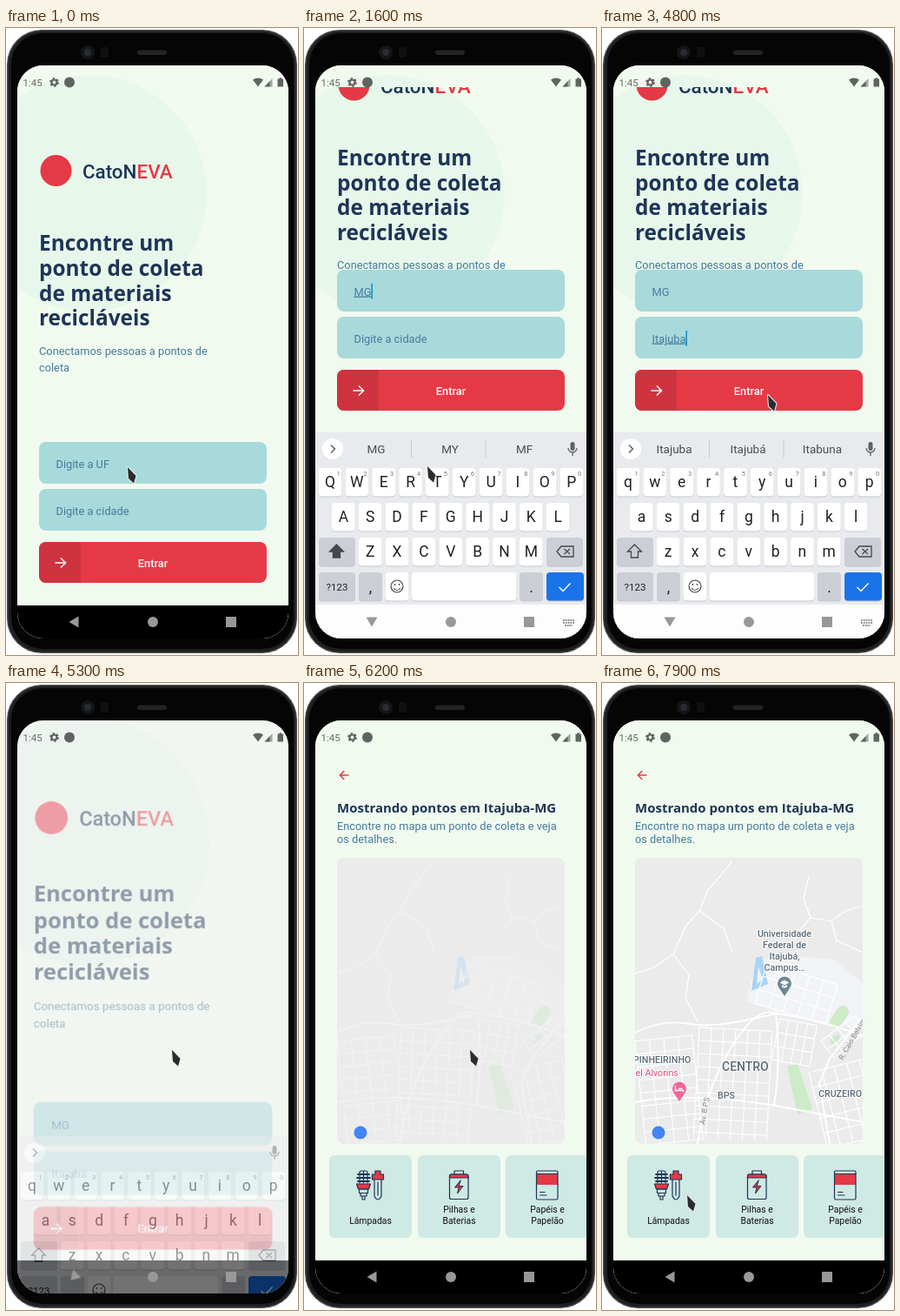
Animation, 336 px wide and 721 px high, one loop 8000 ms. Source, as an HTML page:

```html
<!DOCTYPE html>
<html lang="pt">
<head>
<meta charset="utf-8">
<title>Pontos de coleta</title>
<style>
html, body { margin: 0; width: 100%; height: 100%; overflow: hidden; background: #fff; }
svg { display: block; width: 336px; height: 721px; font: 12.8px Roboto, sans-serif; }
.title { font: 700 24.4px "Open Sans", sans-serif; fill: #1d3557; }
.sub { fill: #457b9d; }
.mid { text-anchor: middle; }
.field { fill: #a8dadc; }
.entry { fill: #457b9d; }
.entry.live { text-decoration: underline; }
.card { fill: #cfe9e4; }
.label { font-size: 10.4px; text-anchor: middle; fill: #111; }
.line { fill: none; stroke: #1d3557; stroke-width: 1.2; stroke-linejoin: round; stroke-linecap: round; }
.road { fill: none; stroke: #fff; stroke-linecap: round; stroke-linejoin: round; }
.place { font-weight: 500; fill: #5b6b7a; stroke: #fff; stroke-width: 2; paint-order: stroke; }
.street { font-size: 8.4px; fill: #7d8388; }
.key { font-size: 17.5px; text-anchor: middle; fill: #202124; }
.hint { font-size: 7.5px; text-anchor: middle; fill: #777; }
.word { font-size: 13.5px; text-anchor: middle; fill: #4a4d51; }

.anim { animation: 8s linear -20ms infinite both; }
#home { animation-name: leave; transform-origin: 168.5px 353.5px; }
#head { animation-name: head; }
#form { animation-name: form; }
#keys { animation-name: keys; }
#back { animation-name: back; transform-origin: 78px 683px; }
#details { animation-name: details; }
#badge { animation-name: badge; }
#places { animation-name: places; }
#roads { animation-name: roads; }
#names { animation-name: names; }
#mouse { animation-name: mouse; }

@keyframes leave {
  0% { transform: none; opacity: 1; animation-timing-function: step-end }
  65% { transform: scale(1.02); opacity: .85; animation-timing-function: step-end }
  66.25% { transform: scale(1.0476); opacity: .46; animation-timing-function: step-end }
  67.5% { transform: scale(1.05); opacity: .2; animation-timing-function: step-end }
  68.75% { transform: scale(1.05); opacity: .06; animation-timing-function: step-end }
  72.5%, 100% { transform: scale(1.05); opacity: 0 }
}
@keyframes head {
  0%, 5% { transform: none; animation-timing-function: steps(5, jump-start) }
  11.25% { transform: translateY(-98.5px); animation-timing-function: step-end }
  65%, 100% { transform: none }
}
@keyframes form {
  0%, 5% { transform: none; animation-timing-function: steps(5, jump-start) }
  11.25% { transform: translateY(-198px); animation-timing-function: step-end }
  65%, 100% { transform: none }
}
@keyframes keys {
  0% { transform: translateY(90px); opacity: 0; animation-timing-function: step-end }
  5% { transform: translateY(80px); opacity: .2; animation-timing-function: step-end }
  6.25% { transform: translateY(35px); opacity: .6; animation-timing-function: step-end }
  7.5% { transform: translateY(8px); opacity: .95; animation-timing-function: step-end }
  8.75% { transform: none; opacity: 1; animation-timing-function: step-end }
  65% { transform: translateY(20px); opacity: .8; animation-timing-function: step-end }
  66.25% { transform: translateY(56px); opacity: .45; animation-timing-function: step-end }
  67.5% { transform: translateY(75px); opacity: .15; animation-timing-function: step-end }
  68.75%, 100% { transform: translateY(90px); opacity: 0 }
}
@keyframes back {
  0%, 5% { transform: none; animation-timing-function: steps(4, jump-start) }
  10%, 65% { transform: rotate(-90deg); animation-timing-function: steps(4, jump-start) }
  70%, 100% { transform: none }
}
@keyframes details {
  0% { opacity: 0; animation-timing-function: step-end }
  67.5% { opacity: .3; animation-timing-function: step-end }
  68.75% { opacity: .85; animation-timing-function: step-end }
  72.5%, 100% { opacity: 1 }
}
@keyframes badge {
  0% { opacity: 0; transform: translateY(95px); animation-timing-function: step-end }
  72.5% { opacity: 1; transform: translateY(95px); animation-timing-function: step-end }
  75%, 100% { opacity: 1; transform: none }
}
@keyframes places {
  0% { opacity: 0; animation-timing-function: step-end }
  75%, 100% { opacity: 1 }
}
@keyframes roads {
  0%, 77.5% { opacity: 0; animation-timing-function: steps(3, jump-start) }
  81.25%, 100% { opacity: 1 }
}
@keyframes names {
  0%, 81.25% { opacity: 0; animation-timing-function: steps(2, jump-start) }
  83.75%, 100% { opacity: 1 }
}
@keyframes mouse {
  0% { transform: translate(140px, 505px); animation-timing-function: step-end }
  5%, 25% { transform: translate(142px, 504px); animation-timing-function: steps(5, jump-start) }
  31.25%, 56.25% { transform: translate(172px, 353px); animation-timing-function: steps(4, jump-start) }
  61.25%, 85% { transform: translate(191px, 422px); animation-timing-function: steps(3, jump-start) }
  88.75%, 90% { transform: translate(201px, 478px); animation-timing-function: steps(8, jump-start) }
  100% { transform: translate(98px, 589px) }
}
</style>
</head>
<body>
<svg viewBox="0 0 336 721">
  <defs>
    <clipPath id="screen"><rect x="13" y="43" width="312" height="659" rx="30"/></clipPath>
    <clipPath id="below"><rect x="0" y="68" width="336" height="640"/></clipPath>
    <clipPath id="mapBox"><rect x="38" y="201" width="262" height="329" rx="8"/></clipPath>
  </defs>

  <!-- phone -->
  <rect x="1" y="2" width="334" height="717" rx="40" fill="#46484c"/>
  <rect x="2.500" y="3.500" width="331" height="714" rx="38.500" fill="#1d1f21"/>
  <rect x="6" y="6" width="325" height="708" rx="36" fill="#050505"/>
  <circle cx="94" cy="28" r="8" fill="#141517"/>
  <circle cx="94" cy="28" r="4" fill="#282b30"/>
  <rect x="109" y="22" width="9" height="12" rx="2" fill="#101010"/>
  <rect x="151" y="25.500" width="34" height="5.500" rx="2.700" fill="#242425"/>

  <g clip-path="url(#screen)">
    <rect x="13" y="43" width="312" height="659" fill="#f2f2f2"/>

    <g id="home" class="anim">
      <rect x="13" y="43" width="312" height="659" fill="#f1faee"/>
      <circle cx="95" cy="190" r="136" fill="#e8f7eb"/>
      <g clip-path="url(#below)">
        <g id="head" class="anim">
          <circle cx="57.500" cy="164" r="18" fill="#e63946"/>
          <text x="88" y="173" font-size="22.400" font-weight="500" fill="#1d3557">CatoN<tspan fill="#e63946">EVA</tspan></text>
          <g class="title">
            <text x="38" y="256">Encontre um</text>
            <text x="38" y="285">ponto de coleta</text>
            <text x="38" y="313.500">de materiais</text>
            <text x="38" y="342">recicláveis</text>
          </g>
          <text class="sub" x="38" y="375.500">Conectamos pessoas a pontos de</text>
          <text class="sub" x="38" y="394.500">coleta</text>
        </g>
        <g id="form" class="anim">
          <rect class="field" x="38" y="476" width="262" height="48" rx="8"/>
          <rect class="field" x="38" y="530" width="262" height="48" rx="8"/>
          <text class="entry" x="57.500" y="505.500"></text>
          <text class="entry" x="57.500" y="559.500"></text>
          <rect id="caret" width="1.600" height="17.500" fill="#168fc4"/>
          <rect x="38" y="591" width="262" height="47" rx="8" fill="#e63946"/>
          <path d="M46 591H86V638H46a8 8 0 0 1-8-8V599a8 8 0 0 1 8-8Z" fill="#cf333f"/>
          <path d="M56.500 615H68.500M63 609.500 68.500 615 63 620.500" fill="none" stroke="#fff" stroke-width="1.600"/>
          <text class="mid" x="169" y="619.500" fill="#fff" font-weight="500">Entrar</text>
        </g>
      </g>
    </g>

    <g id="details" class="anim">
      <rect x="13" y="43" width="312" height="659" fill="#f1faee"/>
      <path d="M51.500 106H41.500M46.300 101 41.300 106 46.300 111" fill="none" stroke="#e63946" stroke-width="1.400"/>
      <text class="title" x="38" y="148.500" style="font-size:15px">Mostrando pontos em Itajuba-MG</text>
      <text class="sub" x="38" y="168.500">Encontre no mapa um ponto de coleta e veja</text>
      <text class="sub" x="38" y="183.500">os detalhes.</text>

      <g id="places" class="anim">
        <g clip-path="url(#mapBox)">
          <rect x="38" y="201" width="262" height="329" fill="#ebebeb"/>
          <g id="roads" class="anim">
            <path d="M166 366 176 326 200 312 266 318 300 345V398L262 392 204 380Z" fill="#f1f3f6"/>
            <path d="M172 354 177 316 184 314 191 346 182 350Z" fill="#a9d4f5"/>
            <path d="M178 346 180 326 185 341Z" fill="#f1f3f6"/>
            <g fill="#cdeac9">
              <rect x="266" y="370" width="14" height="28" rx="7" transform="rotate(35 273 384)"/>
              <ellipse cx="268" cy="410" rx="7" ry="3.500" transform="rotate(-45 268 410)"/>
              <path d="M213 441 225 438 242 489 225 497Z"/>
            </g>
            <g id="grids" class="road"></g>
            <g class="road" stroke-width="1.200">
              <path d="M136 222 122 238 112 262 96 280 82 312 58 328 38 334M112 262 140 282 150 310M136 222 150 204M82 312 100 336 96 362 110 390"/>
              <path d="M300 256 280 262 264 274 240 270 232 248 238 222M264 274 270 296 300 310M240 270 228 284"/>
            </g>
            <g class="road" stroke-width="1.900">
              <path d="M38 402Q70 386 100 392T200 380Q250 386 300 406"/>
              <path d="M110 530Q118 470 148 420T200 380"/>
              <path d="M200 380Q206 440 198 486M300 384 262 432 250 460 262 530"/>
              <path d="M38 482Q100 470 200 486L300 505"/>
            </g>
          </g>
          <g id="names" class="anim">
            <g class="place mid" font-size="10.700">
              <text x="210" y="292">Universidade</text>
              <text x="210" y="305">Federal de</text>
              <text x="210" y="318">Itajubá,</text>
              <text x="210" y="331">Campus…</text>
            </g>
            <g class="place" font-size="10.700">
              <text x="36" y="437">PINHEIRINHO</text>
              <text x="133" y="478">BPS</text>
              <text x="249" y="475.500">CRUZEIRO</text>
              <text x="138" y="446" font-size="14">CENTRO</text>
              <text x="35" y="452" fill="#d8487f" style="font-weight:400">tel Alvorins</text>
            </g>
            <text class="street" transform="translate(118 508) rotate(-80)">Av. B.P.S</text>
            <text class="street" transform="translate(277 434) rotate(-60)">R. Caio Belvim</text>
            <path d="M210 360 204 351A8 8 0 1 1 216 351Z" fill="#6d8794"/>
            <path d="M204.500 344.500 210 341.500 215.500 344.500 210 347.500ZM207 347V349.500Q210 351.500 213 349.500V347L210 348.800Z" fill="#fff"/>
            <path d="M89 481 83 472A8 8 0 1 1 95 472Z" fill="#f0659a"/>
            <path d="M84.500 463V470M84.500 468.500H93.500V470M88 466.500H92.500" fill="none" stroke="#fff" stroke-width="1.400"/>
          </g>
        </g>

        <rect class="card" x="29" y="543" width="95" height="95" rx="6"/>
        <rect class="card" x="131" y="543" width="95" height="95" rx="6"/>
        <rect class="card" x="232" y="543" width="95" height="95" rx="6"/>
        <g class="label">
          <text x="76.500" y="621.500">Lâmpadas</text>
          <text x="178.500" y="609">Pilhas e</text>
          <text x="178.500" y="621.500">Baterias</text>
          <text x="280" y="609">Papéis e</text>
          <text x="280" y="621.500">Papelão</text>
        </g>
        <g class="line">
          <path d="M64 575V563Q64 561 66 561H71Q73 561 73 563V575M68.500 561V575"/>
          <path d="M62 565H75M61 569H76M62 573H75" stroke-width="1.800"/>
          <path d="M60.500 576H76.500L74.500 582H62.500Z" fill="#e63946"/>
          <path d="M63.500 582H73.500V586.500H63.500ZM65 586.500H72V590H65ZM67 590V594H70V590"/>
          <path d="M82 561H88V565H91.500V571H78.500V565H82Z" fill="#e63946"/>
          <path d="M81 571V590Q85 598 89 590V571M85 574V589"/>
          <rect x="167.500" y="565" width="21.500" height="28.500" rx="2"/>
          <path d="M167.500 569V567Q167.500 565 169.500 565H187Q189 565 189 567V569Z" fill="#e63946"/>
          <path d="M173 565V561H183.500V565"/>
          <path d="M180 572 173.500 580H178L176.500 587 183 578.500H178.500Z" fill="#e63946" stroke-width="1"/>
          <path d="M268 564.500H292V577H268Z" fill="#e63946" stroke="none"/>
          <rect x="267.500" y="561" width="24.500" height="33" rx="1.500"/>
          <path d="M268 564.500H292M271.500 585.500H277M271.500 589H279"/>
        </g>
      </g>
      <circle id="badge" class="anim" cx="65" cy="517" r="7.500" fill="#4285f4"/>
    </g>

    <rect x="13" y="664" width="312" height="38" fill="#000"/>

    <g id="keys" class="anim">
      <rect x="13" y="465" width="312" height="198" fill="#e8eaed"/>
      <rect x="13" y="663" width="312" height="130" fill="#fdfdfd"/>
      <circle cx="33" cy="484" r="12" fill="#fff"/>
      <path id="chevron" d="M31 479.500 35.500 484 31 488.500" fill="none" stroke="#5f6368" stroke-width="1.500"/>
      <text class="word" x="83" y="488.500"></text>
      <text class="word" x="168" y="488.500"></text>
      <text class="word" x="253.500" y="488.500"></text>
      <path id="rules" d="M123.500 474V494M209 474V494" stroke="#c9ccd0"/>
      <rect x="306.500" y="476" width="5" height="10" rx="2.500" fill="#5f6368"/>
      <path d="M304 483a5 5 0 0 0 10 0M309 488V492" fill="none" stroke="#5f6368" stroke-width="1.300"/>
      <g id="pad"></g>
      <path id="shift" d="M37.500 594 45.500 602H41.500V609H33.500V602H29.500Z" stroke="#44474b" stroke-width="1.300"/>
      <path d="M291 602 296 596H310V608H296ZM299.500 599 306 605M306 599 299.500 605" fill="none" stroke="#44474b" stroke-width="1.300"/>
      <g fill="none" stroke="#44474b" stroke-width="1.200">
        <circle cx="107" cy="642" r="7"/>
        <path d="M103 644Q107 649 111 644M104.500 639V641M109.500 639V641"/>
      </g>
      <path d="M293.500 643 298 647.500 306.500 638.500" fill="none" stroke="#fff" stroke-width="1.500"/>
      <path d="M298 681H311M298 684H311M300 687H309" stroke="#8c8c8c" stroke-width="1.800" stroke-dasharray="1.800 1"/>
    </g>

    <g fill="#989898">
      <path id="back" class="anim" d="M72.500 683 83.500 676.500V689.500Z"/>
      <circle cx="169" cy="683" r="6"/>
      <rect x="253" y="677" width="12" height="12"/>
    </g>

    <!-- status bar -->
    <g fill="#5f6361">
      <text x="19.500" y="67" font-size="11.500" fill="#666a68">1:45</text>
      <circle cx="55.500" cy="62.500" r="3" fill="none" stroke="#5f6361" stroke-width="2.200"/>
      <circle cx="55.500" cy="62.500" r="4.600" fill="none" stroke="#5f6361" stroke-width="1.700" stroke-dasharray="2.400 2.417"/>
      <circle cx="73" cy="62.500" r="6"/>
      <path d="M284 59.500Q290 55.500 296 59.500L290 67.500Z"/>
      <path d="M297.500 67.500 306.500 58V67.500Z" opacity=".55"/>
      <path d="M297.500 67.500 303.500 61.200V67.500Z"/>
      <path d="M312.500 58.500H314.500V57.300H317V58.500H319V67.500H312.500Z"/>
    </g>
  </g>

  <g id="mouse" class="anim">
    <path d="M0 0 9.500 10 7 18.500 1 13Z" fill="#2c2c2e" stroke="#e9ecea" stroke-width="2.200" stroke-linejoin="round" paint-order="stroke"/>
  </g>
</svg>
<script>
const $ = id => document.getElementById(id);
const all = sel => [...document.querySelectorAll(sel)];

// keyboard
const keyRect = (x, y, w, h, fill) =>
  `<rect x="${x}" y="${y + 1}" width="${w}" height="${h}" rx="4" fill="#c3c6ca"/>` +
  `<rect x="${x}" y="${y}" width="${w}" height="${h}" rx="4" fill="${fill}"/>`;
const grey = '#cbced4';
let pad = '';
[['qwertyuiop', 30, 506], ['asdfghjkl', 45.4, 546], ['zxcvbnm', 76.2, 586]].forEach(([row, x0, y], r) =>
  [...row].forEach((c, i) => {
    const x = x0 + i * 30.85;
    pad += keyRect(x - 13.3, y, 26.6, 32.5, '#fff') + `<text class="key letter" x="${x}" y="${y + 22}">${c}</text>`;
    if (!r) pad += `<text class="hint" x="${x + 9.5}" y="${y + 8.5}">${(i + 1) % 10}</text>`;
  }));
[[17, 586, 42, grey], [279, 586, 42, grey], [17, 626, 42, grey], [63, 626, 27, grey], [93.5, 626, 27, '#fff'],
 [124, 626, 120, '#fff'], [248, 626, 27, grey], [279, 626, 43, '#1a73e8']]
  .forEach(([x, y, w, fill]) => pad += keyRect(x, y, w, 32.5, fill));
pad += '<text class="key" x="38" y="647" style="font-size:11.5px">?123</text>' +
  '<text class="key" x="76.500" y="649">,</text><text class="key" x="261.500" y="649">.</text>';
$('pad').innerHTML = pad;

// street blocks: origin, size, tilt, gaps
const grid = (x, y, w, h, tilt, gx, gy) => {
  let d = '';
  for (let i = 0; i <= w; i += gx) d += `M${i} 0V${h}`;
  for (let j = 0; j <= h; j += gy) d += `M0 ${j}H${w}`;
  return `<path transform="translate(${x} ${y}) rotate(${tilt})" d="${d}" stroke-width="1.1"/>`;
};
$('grids').innerHTML = grid(112, 396, 84, 126, 3, 14, 15) + grid(38, 412, 66, 120, -6, 16.5, 15) +
  grid(204, 386, 44, 48, 10, 11, 16) + grid(190, 322, 85, 48, 17, 17, 16) +
  grid(238, 448, 75, 90, -14, 15, 18) + grid(252, 412, 48, 24, -38, 12, 12);

// typing: [from ms, value]
const uf = [[0, ''], [1400, 'M'], [1500, 'MG']];
const city = [[0, ''], [3300, 'I'], [3500, 'It'], [3600, 'Ita'], [3700, 'Itaj'], [3800, 'Itaju'], [4000, 'Itajub'], [4100, 'Itajuba']];
const words = [[0, ''], [1400, 'M My Me'], [1500, 'MG MY MF'], [2700, ''], [3300, "I I'm It"], [3500, "It It's If"],
  [3700, 'Ita Italy Its'], [4000, 'Itajub Itajuba Itajubá'], [4300, 'Itajuba Itajubá Itabuna'], [5200, '']];
const focus = [[0, -1], [500, 0], [2700, 1], [5200, -1]];
const blink = [[0, 1], [1000, 0], [1400, 1], [2000, 0], [2400, 1], [3100, 0], [3300, 1], [4500, 0], [4800, 1]];
const at = (list, t) => list.findLast(e => e[0] <= t)[1];

const entries = all('.entry'), slots = all('.word'), letters = all('.letter');
const hints = ['Digite a UF', 'Digite a cidade'];

function draw(t) {
  const typed = [at(uf, t), at(city, t)], f = at(focus, t), sug = at(words, t), caps = t < 3300;
  entries.forEach((el, i) => {
    el.textContent = typed[i] || hints[i];
    el.classList.toggle('live', i === f && typed[i] !== '');
  });
  const caret = $('caret');
  caret.style.opacity = f < 0 ? 0 : at(blink, t);
  if (f >= 0) {
    caret.setAttribute('x', 57.5 + (typed[f] ? entries[f].getComputedTextLength() : 0));
    caret.setAttribute('y', 492 + 54 * f);
  }
  slots.forEach((el, i) => el.textContent = sug.split(' ')[i] || '');
  $('rules').style.opacity = sug ? 1 : 0;
  $('chevron').setAttribute('transform', sug || t >= 5200 ? '' : 'rotate(180 33 484)');
  $('shift').setAttribute('fill', caps ? '#44474b' : 'none');
  letters.forEach(el => el.textContent = caps ? el.textContent.toUpperCase() : el.textContent.toLowerCase());
}

const start = performance.now();
let last = -1;
function tick() {
  const t = Math.floor((performance.now() - start + 20) % 8000 / 100) * 100;
  if (t !== last) draw(last = t);
  requestAnimationFrame(tick);
}
tick();
</script>
</body>
</html>
```
